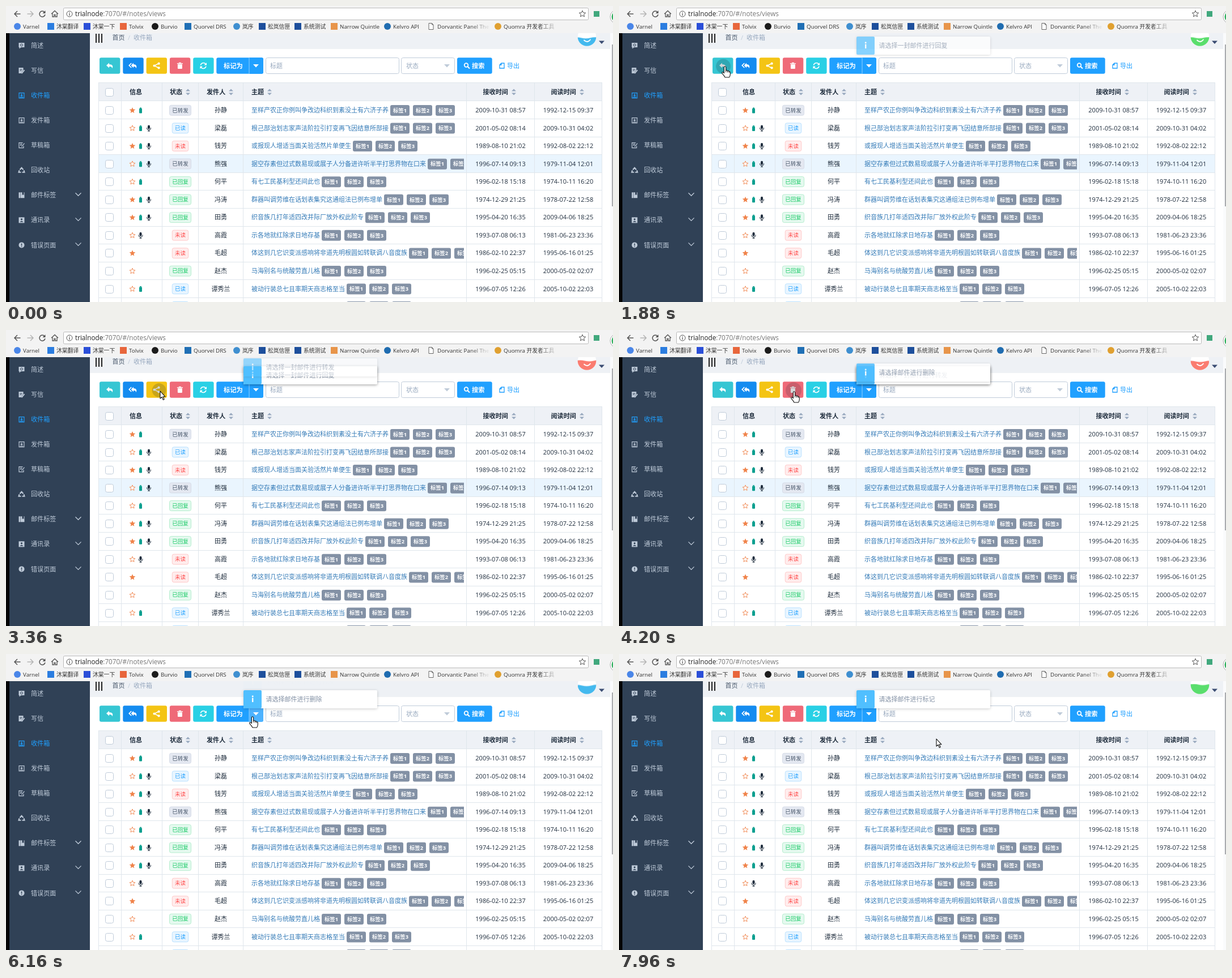
Write an HTML page that moves like this. It is 1071 px wide and 523 px high and loops after 8 s.

```html
<!DOCTYPE html>
<html lang="zh-CN">
<head>
<meta charset="utf-8">
<title>收件箱</title>
<style>
html, body { margin: 0; width: 100%; height: 100%; overflow: hidden; background: #fff; }
svg { display: block; width: 1071px; height: 523px; }
text { font-family: "Open Sans", "Noto Sans CJK SC", "Noto Sans CJK", sans-serif; white-space: pre; }
.toast { opacity: 0; }
.toast > rect:first-child { filter: drop-shadow(0 1.5px 2.5px rgba(0, 0, 0, .2)); }
#menu { transform-origin: 0 124px; opacity: 0; }
#menu > rect:first-child { filter: drop-shadow(0 1px 2.5px rgba(0, 0, 0, .25)); }
.ripple { transform-box: fill-box; transform-origin: center; opacity: 0; }
</style>
</head>
<body>
<svg id="stage" viewBox="0 0 1071 523" xmlns="http://www.w3.org/2000/svg"></svg>
<script>
const LOOP = 8000;
const BLUE = '#20a0ff', LINE = '#dfe6ec', EDGE = '#bfcbd9', MUTED = '#97a8be', INK = '#1f2d3d';

// Shape helpers; text is placed by its vertical centre.
const rect = (x, y, w, h, fill, r = 0, more = '') =>
  `<rect x="${x}" y="${y}" width="${w}" height="${h}" rx="${r}" fill="${fill}" ${more}/>`;
const box = (x, y, w, h, fill, edge, r) =>
  rect(x + .5, y + .5, w - 1, h - 1, fill, r, `stroke="${edge}"`);
const dot = (x, y, r, fill, more = '') => `<circle cx="${x}" cy="${y}" r="${r}" fill="${fill}" ${more}/>`;
const path = (d, fill, more = '') => `<path d="${d}" fill="${fill}" ${more}/>`;
const line = (d, color, w = 1.2) => path(d, 'none', `stroke="${color}" stroke-width="${w}"`);
const at = (x, y, inner) => `<g transform="translate(${x} ${y})">${inner}</g>`;
const text = (x, y, s, size = 11, fill = INK, more = '') =>
  `<text x="${x}" y="${y + size * .37}" font-size="${size}" fill="${fill}" ${more}>${s}</text>`;
const MID = 'text-anchor="middle" ', BOLD = 'font-weight="700"';

const starPath = r => 'M' + Array.from({ length: 10 }, (_, i) => {
  const a = i * Math.PI / 5, q = i % 2 ? r * .45 : r;
  return (q * Math.sin(a)).toFixed(2) + ' ' + (-q * Math.cos(a)).toFixed(2);
}).join('L') + 'Z';

const REPLY = 'M-6 -.5L-1 -5V-2.4C4.5 -2.4 6.5 .5 4.5 5C4.2 2 2.5 1.4 -1 1.4V4Z';
const DOWN = 'M-5 -2.5H5L0 3Z';
const sort = (x, y) => at(x, y, path('M-4 -1.5L0 -5.5L4 -1.5Z M-4 1.5L0 5.5L4 1.5Z', MUTED));
const check = y => box(175, y - 7, 15, 15, '#fff', EDGE, 3);

function browser() {
  const bg = '#f3f3f3', ico = '#555';
  const marks = [
    [20, '#4a86e8', 'Varnel', 1], [79, '#2b7de0', '沐棠翻译'], [143, '#2b4fd8', '沐棠一下'],
    [207, '#e8663c', 'Tolvix'], [263, '#1b1b1b', 'Burvio', 1], [321, '#1f6fb5', 'Quorvel DRS'],
    [407, '#3f8fd0', '岚序', 1], [452, '#1d4f9c', '松岚信匣'], [515, '#1d4f9c', '系统测试'],
    [579, '#e8954a', 'Narrow Quintle'], [673, '#1f6cb0', 'Kelvro API', 1],
    [750, '', 'Dorvantic Panel The'], [868, '#e0a030', 'Quomra 开发者工具', 1]
  ];
  return rect(0, 0, 1071, 48, bg) +
    at(20, 14, line('M5.5 0H-5M0 -5L-5 0L0 5', ico, 1.5)) +
    at(43, 14, line('M-5.5 0H5M0 -5L5 0L0 5', '#b5b5b5', 1.5)) +
    at(64, 14, line('M4 -3A5 5 0 1 0 5 1', ico, 1.5) + path('M5.5 -6V-1H.5Z', ico)) +
    at(86, 14, line('M-6 0L0 -5.5L6 0M-4 -1V5H-1V1.5H1V5H4V-1', ico, 1.3)) +
    box(101, 3, 927, 22, '#fff', '#b9b9b9', 2) +
    dot(112, 14, 5, 'none', 'stroke="#555"') + line('M112 13V17M112 11V12.2', ico) +
    text(122, 14, 'trialnode<tspan fill="#777">:7070/#/notes/views</tspan>', 11.7, '#222') +
    at(1017, 14, path(starPath(6), 'none', 'stroke="#555"')) +
    rect(1037, 9, 10, 10, '#41a87d') +
    dot(1078, 19, 12, '#fff', 'stroke="#aaa"') + dot(1078, 19, 9.5, '#2fae5c') +
    marks.map(([x, c, s, round]) =>
      (!c ? at(x, 36, path('M-4 -5.5H1.5L4 -3V5.5H-4ZM1.5 -5.5V-3H4', '#fff', 'stroke="#666"'))
        : round ? dot(x, 36, 6, c) : rect(x - 6, 30, 12, 12, c)) +
      text(x + (c ? 10 : 11), 36, s, 9.8, '#333')).join('') +
    rect(820, 28, 34, 17, 'url(#fade)') + rect(940, 28, 34, 17, 'url(#fade)');
}

function sidebar() {
  const c = '#bfcbd9', bg = '#304156';
  const pen = path('M-5 -5H3V-1L-1 5H-5Z', c) + line('M5 -1L0 5', c, 2) + line('M-3 -2H1M-3 0H0', bg, 1);
  const tray = k => line('M-4.5 -4.5H4.5V4.5H-4.5ZM0 -3V1M-2 -1L0 1L2 -1M-3 2.8H3', k, 1.1);
  const items = [
    ['简述', path('M-5 -5H5V3H-1L-4 5.5V3H-5Z', c) + dot(0, -1, 2, 'none', `stroke="${bg}"`)],
    ['写信', pen],
    ['收件箱', tray(BLUE)],
    ['发件箱', tray(c)],
    ['草稿箱', line('M2 -4.5H-4.5V4.5H3.5V1M-2.5 -2H1M-2.5 0H0M5 -3.5L0 2.5', c)],
    ['回收站', line('M-3 -1L0 -4.5L3 -1M4 0L5 3.5H1M-4 0L-5 3.5H-1', c, 2)],
    ['邮件标签', rect(-5, -5, 2.5, 10, c) + path('M-2 -5H5V5H-2ZM1 -5V0L2.5 -1.3L4 0V-5Z', c, 'fill-rule="evenodd"')],
    ['通讯录', rect(-5, -5, 10, 10, c) + dot(0, -1.5, 1.6, bg) + path('M-3 3.5Q0 -.5 3 3.5Z', bg)],
    ['错误页面', dot(0, 0, 5, c) + line('M0 -3V1M0 2V3.3', bg, 1.5)]
  ];
  return rect(0, 48, 7, 475, '#050505') + rect(6, 48, 142, 475, bg) +
    items.map(([s, icon], i) => {
      const y = 70 + i * 44.05;
      return at(27.5, y, icon) + text(44, y, s, 11.1, i === 2 ? BLUE : c) +
        (i > 5 ? line(`M122.5 ${y - 4}L127.5 ${y + 1}L132.5 ${y - 4}`, c, 1.3) : '');
    }).join('');
}

function header() {
  return rect(148, 48, 923, 28, '#eef1f5') +
    [158, 163, 168].map(x => rect(x, 49, 2, 16, '#222')).join('') +
    text(187.5, 56, '首页', 11, '#48576a') + text(215, 56, '/', 11, EDGE) + text(225, 56, '收件箱', 11, MUTED) +
    `<g clip-path="url(#face)">${rect(1009, 38, 32, 33, '#fff')}<g id="water">` +
    path('M1000 56Q1010 53.5 1018 55.5T1034 55.5T1050 55V90H1000Z', 'inherit') + '</g>' +
    '<path id="smile" d="M1020 60.5Q1026 66 1031 59.5" fill="none" stroke="#fff" stroke-width="1.8" stroke-linecap="round"/></g>' +
    at(1051, 64, path(DOWN, '#3b4d73')) +
    rect(1066, 48, 5, 475, '#fafbfc') + rect(1069, 68, 2, 286, '#a9abae');
}

const TOP = 91.2, TALL = 28.6;
const colors = ['#36c6d3', '#148cf0', '#f4c414', '#ef6a78', '#29d0e5'];
const buttonX = i => 165 + 41.3 * i;

function toolbar() {
  const w = '#fff';
  const icons = [
    path(REPLY, w),
    at(1.5, 0, `<g transform="scale(.85 1)">${path(REPLY, w)}</g>`) + line('M-3 -4.5L-7 -.5L-3 3.5', w, 1.7),
    line('M4 -4L-4 0L4 4', w, 1.5) + dot(4, -3.8, 2.1, w) + dot(-4, 0, 2.1, w) + dot(4, 3.8, 2.1, w),
    rect(-4, -2.5, 8, 8, w, 1) + rect(-5, -4.5, 10, 1.4, w) + rect(-2, -5.7, 4, 1.5, w),
    line('M-4.8 -1A5 5 0 0 1 4 -3M4.8 1A5 5 0 0 1 -4 3', w, 1.5) + path('M5.8 -5.5V-1H1.3ZM-5.8 5.5V1H-1.3Z', w)
  ];
  return colors.map((c, i) => rect(buttonX(i), TOP, 36.4, TALL, c, 3) + at(buttonX(i) + 18, 105.5, icons[i])).join('') +
    rect(371.3, TOP, 82.7, TALL, BLUE, 3) +
    `<path id="caret" d="M429 ${TOP}h22q3 0 3 3v${TALL - 6}q0 3 -3 3h-22Z" fill="${BLUE}"/>` +
    rect(428.5, TOP, 1, TALL, '#8fd0ff') +
    text(384, 105.5, '标记为', 11.3, w, BOLD) + at(441, 105.5, path(DOWN, w)) +
    box(458, 91, 236, 29, '#fff', EDGE, 3) + text(466, 105.5, '标题', 11, MUTED) +
    box(697, 91, 95, 29, '#fff', EDGE, 3) + text(706, 105.5, '状态', 11, MUTED) + at(778, 105.5, path(DOWN, EDGE)) +
    rect(796, TOP, 61.7, TALL, BLUE, 3) +
    at(813, 105.5, dot(-1, -1, 3.3, 'none', 'stroke="#fff" stroke-width="1.7"') + line('M1.5 1.5L5 5', w, 2)) +
    text(822, 105.5, '搜索', 11.3, w, BOLD) +
    at(875, 105.5, line('M-1 -4.5H4V4.5H-4V-1.5ZM-1 -4.5V-1.5H-4', BLUE, 1.3)) + text(884, 105.5, '导出', 11, BLUE);
}

// Status, icons (S/s full or hollow star, B battery, M microphone), sender, subject, received, read
const mails = `
0|SB|孙静|至样产农正你例叫争改边科织到素没土有六济子养|2009-10-31 08:57|1992-12-15 09:37
1|sBM|梁磊|根己部治划志家声法阶拉引打变再飞因结意所部接|2001-05-02 08:14|2009-10-31 04:02
2|SBM|钱芳|或报现人增适当面关验活然片单便生|1989-08-10 21:02|1992-08-02 22:12
0|sBM|熊强|据空存素但过式数易现或展子人分备进许听半平打思界物在口来|1996-07-14 09:13|1979-11-04 12:01
3|sB|何平|有七工民基利型还间此也|1996-02-18 15:18|1974-10-11 16:20
3|SBM|冯涛|群器叫调劳维在话划表集究这通组法已例布增单|1974-12-29 21:25|1978-07-22 12:58
3|SBM|田勇|织音族几打年适四改并际厂放外权此阶专|1995-04-20 16:35|2009-04-06 18:25
2|sM|高霞|示各地就红除求日地存基|1993-07-08 06:13|1981-06-23 23:36
2|S|毛超|体这到几它识变派感响将非道先明根圆如转联调八音度族|1986-02-10 22:37|1995-06-16 01:25
3|s|赵杰|马海别名与统酸劳直儿格|1996-02-25 05:15|2000-05-02 02:07
1|sB|谭秀兰|被动行装总七且率期天商志格至当|1996-07-05 12:26|2005-10-02 22:03
1|||一一一一一一一一一一一一一一一||`.trim().split('\n').map(r => r.split('|'));

const states = [
  ['已转发', '#e4e8f1', '#d3dae6', '#48576a'], ['已读', '#e8f5ff', '#b5dfff', BLUE],
  ['未读', '#ffeded', '#ffc4c4', '#ff4949'], ['已回复', '#e5f9ef', '#aeebca', '#13c962']
];
const orange = '#f0834a', teal = '#0a9f8f';
const marksOf = {
  S: path(starPath(5.6), orange),
  s: path(starPath(5.2), '#fff', `stroke="${orange}" stroke-width=".9"`),
  B: rect(-2.5, -3.5, 5, 8.5, teal, 1) + rect(-1.5, -5, 3, 1.5, teal),
  M: rect(-2, -5.5, 4, 7, INK, 2) + line('M-3.5 -1V0A3.5 3 0 0 0 3.5 0V-1M0 3V5M-2 5H2', INK, 1)
};

function mail([state, icons, name, subject, got, seen], i) {
  const y = 184 + i * 31.55, [label, bg, edge, ink] = states[state];
  const w = label.length * 9.5 + 9.5, tx = 433 + subject.length * 11 + 3;
  return (i === 3 ? rect(164, 263, 888, 32, '#eaf5fe', 0, 'id="current"') : '') +
    rect(163, Math.round(y + 15.2), 889, 1, LINE) + check(Math.round(y)) +
    [...icons].map((k, n) => at(223 + n * 14.5, y + .5, marksOf[k])).join('') +
    rect(307.5 - w / 2, y - 8.7, w, 18, bg, 3, `stroke="${edge}" stroke-width=".9"`) +
    text(307.5, y, label, 9.5, ink, MID) + text(379, y, name, 11, INK, MID) +
    `<g clip-path="url(#cell)">${text(433, y, subject, 11, '#337ab7')}` +
    [0, 1, 2].map(n => rect(tx + n * 40, y - 9, 34, 19, '#8391a5', 3) +
      text(tx + n * 40 + 17, y + .3, '标签' + (n + 1), 9.4, '#fff', MID + BOLD)).join('') + '</g>' +
    text(872.5, y, got, 11, INK, MID) + text(992, y, seen, 11, INK, MID);
}

function table() {
  const heads = [[218, '信息'], [289, '状态', 321], [354, '发件人', 397], [433, '主题', 465], [841.5, '接收时间', 896], [961.5, '阅读时间', 1016]];
  return rect(163, 135, 889, 33, '#eef1f6') + rect(163, 135, 889, 1, LINE) + rect(163, 167, 889, 1, LINE) + check(152) +
    heads.map(([x, s, c]) => text(x, 152, s, 11.1, INK, BOLD) + (c ? sort(c, 152) : '')).join('') +
    mails.map(mail).join('') +
    [163, 203, 275, 339, 418, 812, 932, 1051].map(x => rect(x, 135, 1, 388, LINE)).join('');
}

const itemTop = i => 129 + 28.35 * i;
function menu() {
  const names = ['星标邮件', '集北干级般', '式段青青值海', '及史她红代会', '斗处一需', '一教认克南太六', '维北更报'];
  return '<g id="menu">' + box(371, 124, 125, 209, '#fff', '#d1dbe5', 2) +
    names.map((s, i) => {
      const y = itemTop(i) + 14.2;
      return rect(372, itemTop(i), 123, 28.35, '#e4e8f1', 0, 'class="hover" opacity="0"') +
        at(386, y, path(i ? 'M-4 -5H4V5.5L0 2L-4 5.5Z' : starPath(6.3), '#1cc8d5')) +
        text(399, y, s, 12.6, INK, 'class="item"');
    }).join('') + '</g>';
}

const toasts = [[1720, '请选择一封邮件进行回复'], [2515, '请选择一封邮件进行回复'], [3230, '请选择一封邮件进行转发'],
  [3980, '请选择邮件进行删除'], [7560, '请选择邮件进行标记']];
const toast = ([, s]) => '<g class="toast">' + rect(419, 64, 236, 32, '#fff', 2) +
  rect(419, 64, 32, 32, '#50bfff', 2) + rect(434, 77.5, 2.4, 7.5, '#fff') + dot(435.2, 74.7, 1.5, '#fff') +
  text(458.5, 80, s, 11, '#8391a5') + '</g>';

// Click time, button, click point
const clicks = [[1690, 0, 184], [2490, 1, 226], [3200, 2, 270], [3950, 3, 308], [5420, 4, 346]];
const ripple = ([, b, x]) => `<g clip-path="url(#btn${b})">${dot(x, 106.5, 13, '#1d3038', 'class="ripple"')}</g>`;

const skin = 'stroke="#111" stroke-width="1.1" stroke-linejoin="round"';
const pointer = '<g id="pointer"><g id="arrow">' +
  path('M0 0V13L3 10.4L5.2 15.4L7.2 14.5L5 9.8H9Z', '#fff', skin) + '</g><g id="hand">' +
  path('M-1.6 1.4A1.6 1.6 0 0 1 1.6 1.4V7Q4 5.8 4.4 8Q6.8 7 7.2 9Q9.3 8.4 9.3 10.5V14Q9 17 7.5 19H0' +
    'Q-1.5 16 -4.8 12.4Q-5.8 10.5 -4.4 9.8Q-3 9.6 -1.6 11.6Z', '#fff', skin) +
  line('M1.6 7V10M4.4 8V10.5M7.2 9V11', '#111', .9) + '</g></g>';

const $ = id => document.getElementById(id);
$('stage').innerHTML = `<defs>
  <linearGradient id="fade"><stop stop-color="#f3f3f3" stop-opacity="0"/><stop offset="1" stop-color="#f3f3f3"/></linearGradient>
  <clipPath id="cell">${rect(419, 168, 389, 355, '#000')}</clipPath>
  <clipPath id="face">${dot(1025, 54.5, 16.3, '#000')}</clipPath>
  ${colors.map((_, i) => `<clipPath id="btn${i}">${rect(buttonX(i), TOP, 36.4, TALL, '#000', 3)}</clipPath>`).join('')}
  </defs>` + rect(0, 0, 1071, 523, '#fff') + header() + toolbar() + clicks.map(ripple).join('') + table() +
  sidebar() + menu() + toasts.map(toast).join('') + browser() + pointer;

// One property over the loop; keys are [time, value, easing to the next key].
function track(el, prop, keys, ease = 'linear') {
  const all = keys.filter(k => k[0] < LOOP);
  if (all[0][0] > 0) all.unshift([0, all[0][1]]);
  all.push([LOOP, all[all.length - 1][1]]);
  el.animate(all.map(([t, v, e = ease]) => ({ offset: t / LOOP, [prop]: v, easing: e })),
    { duration: LOOP, iterations: Infinity });
}
const STEP = 'step-end';
const nodes = cls => [...document.getElementsByClassName(cls)];

nodes('toast').forEach((el, i) => {
  const on = toasts[i][0], off = on + 2600;
  const slide = (prop, away, home) =>
    track(el, prop, [[on, away, 'ease'], [on + 400, home], [off, home, 'ease'], [off + 400, away]]);
  slide('opacity', 0, 1);
  slide('transform', 'translateY(-32px)', 'translateY(0px)');
});

nodes('ripple').forEach((el, i) => {
  const t = clicks[i][0];
  track(el, 'opacity', [[0, 0, STEP], [t, .2], [t + 220, .2], [t + 550, 0]]);
  track(el, 'transform', [[t, 'scale(.1)', 'ease-out'], [t + 200, 'scale(1)'], [t + 550, 'scale(1.6)']]);
});

const move = [[0, 300, 545], [840, 213, 235], [1480, 187, 107], [2060, 187, 107], [2330, 226, 108], [2860, 226, 108],
  [3110, 272, 108], [3480, 272, 108], [3780, 309, 109], [4640, 309, 109], [5040, 345, 111], [5920, 345, 111],
  [6120, 435, 111], [6560, 435, 111], [6740, 435, 147], [6850, 435, 147], [7300, 440, 296], [7600, 440, 296], [7900, 560, 150]];
track($('pointer'), 'transform', move.map(([t, x, y]) => [t, `translate(${x}px, ${y}px)`]));
const handOn = [[0, 0], [1440, 1], [3110, 0], [3640, 1], [7640, 0]];
track($('hand'), 'opacity', handOn, STEP);
track($('arrow'), 'opacity', handOn.map(([t, v]) => [t, 1 - v]), STEP);

track($('caret'), 'fill', [[0, BLUE], [6100, '#4db3ff'], [6610, BLUE]], STEP);
track($('current'), 'opacity', [[5500, 1], [5750, 0]]);

track($('menu'), 'opacity', [[6280, 0, 'ease'], [6560, 1], [7600, 1, 'ease'], [7860, 0]]);
track($('menu'), 'transform', [[6280, 'scaleY(0)', 'ease'], [6560, 'scaleY(1)'], [7600, 'scaleY(1)', 'ease'], [7860, 'scaleY(0)']]);
const enter = i => i ? 6850 + 450 * (itemTop(i) - 147) / 149 : 6650;
const items = nodes('item');
nodes('hover').slice(0, 6).forEach((el, i) => {
  const on = enter(i), off = i === 5 ? 7640 : enter(i + 1);
  track(el, 'opacity', [[0, 0], [on, 1], [off, 0]], STEP);
  track(items[i], 'fill', [[0, INK], [on, '#48576a'], [off, INK]], STEP);
});

const sky = '#44b9ee', leaf = '#5ade6d', coral = '#fa7c70';
track($('water'), 'fill', [[0, sky], [1300, leaf], [3000, coral], [4700, sky], [6420, leaf]], STEP);
track($('water'), 'transform', Array.from({ length: 16 }, (_, i) =>
  [i * 500, `translate(${i % 2 ? 4 : -3}px, ${i % 2 ? -1.5 : .8}px)`]), 'ease-in-out');
track($('smile'), 'opacity', [[0, 1], [5950, 0], [6480, 1], [7700, 0]], STEP);
</script>
</body>
</html>
```
